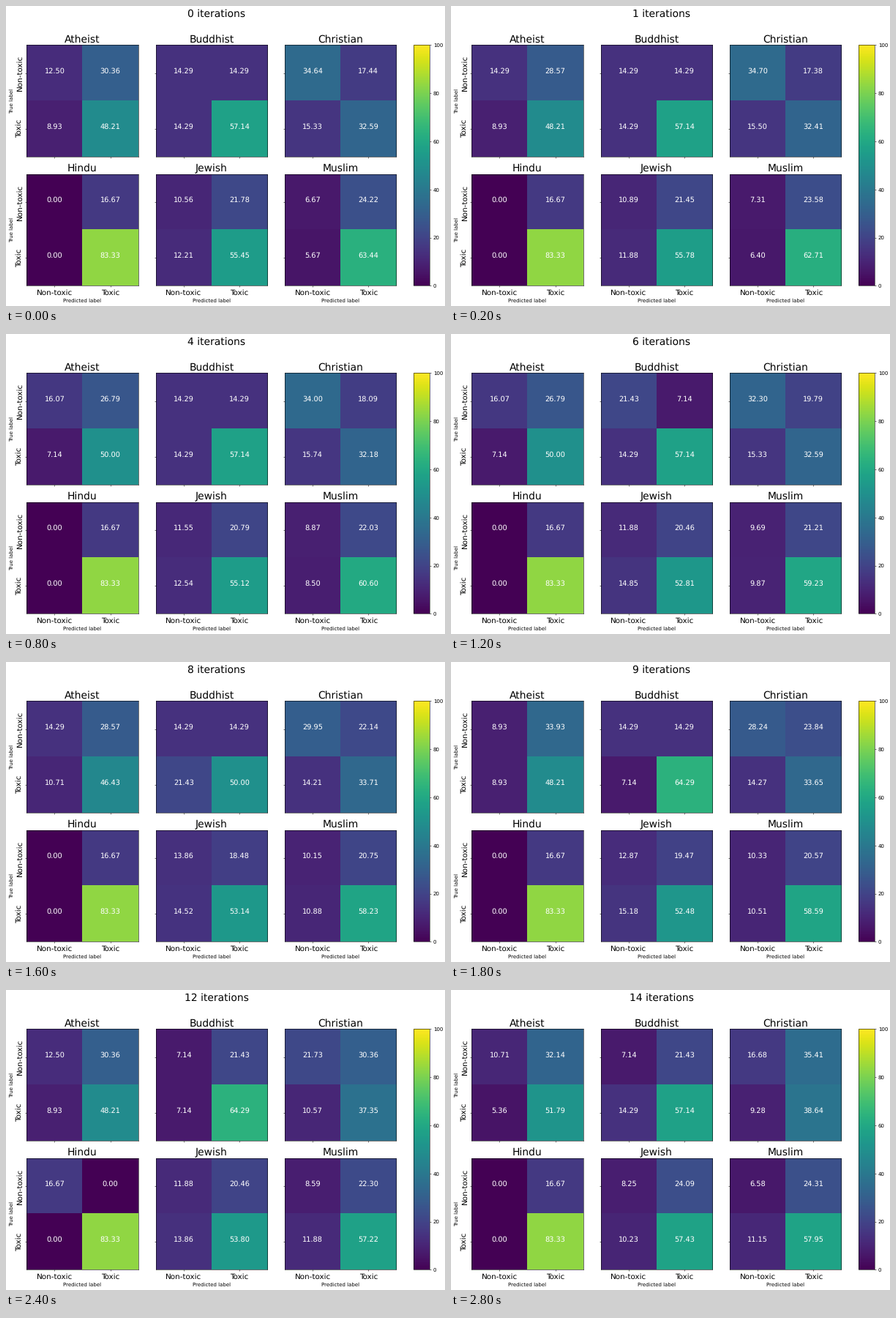
Recreate the animation shown at these times as a matplotlib script. Size 600x410 px, loop 3 s.

```python
import numpy as np
import matplotlib.pyplot as plt
from matplotlib.animation import FuncAnimation

W, H, DPI = 600, 410, 50
FRAMES = 15
SIDE = 152.3
LEFTS = (28.3, 204.7, 381.1)
TOPS = (53.5, 230.0)
LABELS = ["Non-toxic", "Toxic"]

# Known iterations; the ones between are interpolated.
STEPS = [0, 3, 6, 8, 9, 12, 14]

# group: ((row size, counts predicted non-toxic), ...) for true non-toxic / toxic
GROUPS = {
    "Atheist": ((24, [7, 9, 9, 8, 5, 7, 6]),
                (32, [5, 4, 4, 6, 5, 5, 3])),
    "Buddhist": ((4, [2, 1, 3, 2, 2, 1, 1]),
                 (10, [2, 2, 2, 3, 1, 1, 2])),
    "Christian": ((887, [590, 594, 550, 510, 481, 370, 284]),
                  (816, [261, 271, 261, 242, 243, 180, 158])),
    "Hindu": ((1, [0, 0, 0, 0, 0, 1, 0]),
              (5, [0] * 7)),
    "Jewish": ((98, [32, 34, 36, 42, 39, 36, 25]),
               (205, [37, 34, 45, 44, 46, 42, 31])),
    "Muslim": ((338, [73, 93, 106, 111, 113, 94, 72]),
               (756, [62, 85, 108, 119, 115, 130, 122])),
}

plt.rcParams.update({"font.family": "DejaVu Sans", "text.hinting": "none"})


def confusion(rows, i):
    """2x2 matrix in percent of the whole group at iteration i."""
    first = [round(float(np.interp(i, STEPS, counts))) for _, counts in rows]
    sizes = [size for size, _ in rows]
    cells = [[a, n - a] for a, n in zip(first, sizes)]
    return 100 * np.array(cells) / sum(sizes)


def pixel_axes(x, y, w, h):
    return fig.add_axes([x / W, 1 - (y + h) / H, w / W, h / H])


def make_panel(name, row, col):
    ax = pixel_axes(LEFTS[col], TOPS[row], SIDE, SIDE)
    im = ax.imshow(np.zeros((2, 2)), cmap="viridis", vmin=0, vmax=100,
                   aspect="auto", interpolation="nearest")
    ax.set_title(name, fontsize=20)
    ax.set_xticks([0, 1], LABELS if row == 1 else ["", ""], fontsize=15)
    ax.set_yticks([0, 1], LABELS if col == 0 else ["", ""], fontsize=15,
                  rotation=90, va="center")
    if row == 1:
        ax.set_xlabel("Predicted label")
    if col == 0:
        ax.set_ylabel("True label")
    texts = [ax.text(c, r, "", ha="center", color="white", fontsize=14)
             for r in (0, 1) for c in (0, 1)]
    return im, texts


# The small margin keeps float rounding from losing a pixel.
fig = plt.figure(figsize=((W + 0.01) / DPI, (H + 0.01) / DPI), dpi=DPI,
                 facecolor="white")
heading = fig.text(288 / W, 1 - 15.2 / H, "", ha="center", fontsize=20)
panels = {name: make_panel(name, *divmod(k, 3))
          for k, name in enumerate(GROUPS)}

bar_ax = pixel_axes(557.3, TOPS[0], 21.8, TOPS[1] + SIDE - TOPS[0])
fig.colorbar(panels["Atheist"][0], cax=bar_ax, ticks=range(0, 101, 20))


def update(i):
    heading.set_text(f"{i} iterations")
    for name, (im, texts) in panels.items():
        cells = confusion(GROUPS[name], i)
        im.set_data(cells)
        for text, value in zip(texts, cells.flat):
            text.set_text(f"{value:.2f}")
    return []


anim = FuncAnimation(fig, update, frames=FRAMES, interval=200,
                     init_func=lambda: update(0), repeat=True, repeat_delay=0)
plt.show()
```
